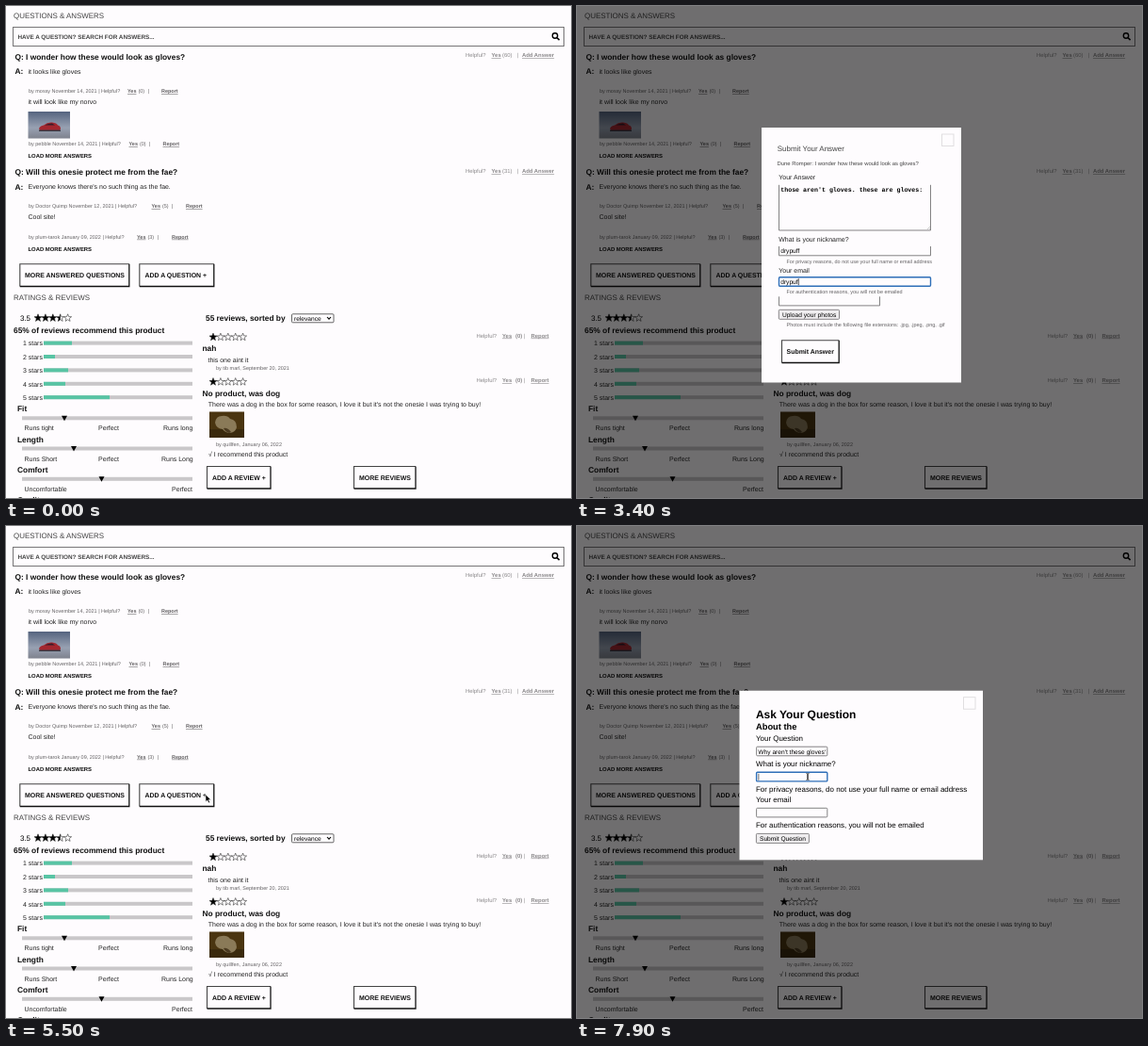
Write an HTML page that moves like this. It is 600 px wide and 522 px high and loops after 8000 ms.

```html
<!DOCTYPE html>
<html lang="en">
<head>
<meta charset="utf-8">
<title>Questions and answers</title>
<style>
  html, body { margin: 0; width: 100%; height: 100%; overflow: hidden; background: #fefcfe; }
  svg { display: block; }
  text { font-family: "Liberation Sans", Arial, sans-serif; white-space: pre; text-rendering: geometricPrecision; }
  .bold { font-weight: bold; }
  .link { font-weight: bold; text-decoration: underline; }
  .mono { font-family: "Liberation Mono", monospace; font-weight: bold; }
</style>
</head>
<body>
<svg id="stage" width="600" height="522" viewBox="0 0 600 522">
  <defs>
    <linearGradient id="sky" x2="0" y2="1">
      <stop offset="0" stop-color="#55647f"/><stop offset=".6" stop-color="#98a1b2"/><stop offset="1" stop-color="#7f838e"/>
    </linearGradient>
  </defs>
  <g id="page"></g>
  <g id="overlay"></g>
</svg>
<script>
const LOOP = 8000, STEP = 100;
const TINY = 5.47, SMALL = 5.9, INPUT = 6.63, BODY = 6.965, BASE = 7.94, HEAD = 8.37, BIG = 11.94;
const WHITE = '#fefcfe', INK = '#222', GREY = '#626062', PALE = '#8c8a8c';

// Drawing helpers, all returning SVG markup
const text = (x, y, size, str, cls = '', fill = INK) =>
  `<text x="${x}" y="${y}" font-size="${size}" class="${cls}" fill="${fill}">${str.replace(/&/g, '&amp;')}</text>`;
const bold = (x, y, size, str, fill = '#111') => text(x, y, size, str, 'bold', fill);
const rect = (x, y, w, h, fill, more = '') =>
  `<rect x="${x}" y="${y}" width="${w}" height="${h}" fill="${fill}" ${more}/>`;
const path = (d, fill, stroke = 'none', width = 1) =>
  `<path d="${d}" fill="${fill}" stroke="${stroke}" stroke-width="${width}"/>`;

const bigButton = (x, y, w, h, label, pad) =>
  path(`M${x} ${y + h}V${y}H${x + w}`, WHITE, '#444', 1.1) +
  path(`M${x} ${y + h}H${x + w}V${y}`, 'none', '#111', 1.3) +
  bold(x + pad, y + h / 2 + 2.5, BODY, label);

const smallButton = (x, y, w, label, pressed) =>
  rect(x, y, w, 10, pressed ? '#d8d6d8' : '#efedef', 'rx="1" stroke="#6b696b" stroke-width=".8"') +
  text(x + 3.6, y + 7.5, INPUT, label, '', '#000');

function starShape(cx, cy, r) {
  const points = Array.from({ length: 10 }, (_, i) => {
    const a = i * Math.PI / 5, d = i % 2 ? r * .42 : r;
    return `${(cx + d * Math.sin(a)).toFixed(2)} ${(cy - d * Math.cos(a)).toFixed(2)}`;
  });
  return `M${points.join('L')}Z`;
}

function stars(x, y, score) {
  let out = '';
  for (let i = 0; i < 5; i++) {
    const cx = x + 4 + i * 7.9, full = Math.min(1, Math.max(0, score - i));
    out += path(starShape(cx, y, 4.2), full === 1 ? '#000' : 'none', '#222', .55);
    if (full === .5) out += path(`M${cx} ${y - 4.2}L${cx - 1} ${y - 1.3}H${cx - 4}L${cx - 1.6} ${y + .6}L${cx - 2.5} ${y + 3.4}L${cx} ${y + 1.8}Z`, '#000');
  }
  return out;
}

const byline = (y, str, yesX, count, reportX) =>
  text(24, y, TINY, `by ${str} | Helpful?`, '', GREY) +
  text(yesX, y, TINY, 'Yes', 'link', GREY) +
  text(yesX + 11.5, y, TINY, `(${count})`, '', GREY) +
  text(yesX + 21.5, y, TINY, '|', '', GREY) +
  text(reportX, y, TINY, 'Report', 'link', GREY);

const helpful = (x, y, count, countX, barX, linkX, link, cls) =>
  text(x, y, SMALL, 'Helpful?', '', PALE) +
  text(x + 27.5, y, SMALL, 'Yes', 'link', PALE) +
  text(x + countX, y, SMALL, `(${count})`, cls, PALE) +
  text(x + barX, y, SMALL, '|', '', PALE) +
  text(x + linkX, y, SMALL, link, 'link', PALE);
const questionHelp = (y, count) => helpful(488, y, count, 39, 55, 60, 'Add Answer', '');
const reviewHelp = y => helpful(499.5, y, 0, 41.5, 50.5, 58, 'Report', 'bold');

const slider = (y, name, mark, labels) =>
  bold(12, y, HEAD, name) + rect(17, y + 5, 181, 4, '#c9c7c9') +
  path(`M${mark - 3} ${y + 4.4}h6l-3 5.6z`, '#000') +
  labels.map(([x, label]) => text(x, y + 20, BODY, label)).join('');

const carPhoto = () =>
  rect(23.5, 112, 44.5, 28.5, 'url(#sky)') +
  path('M35 130q1-3 5-3.500q4-3.500 9-3q5 .5 6 3q3 .5 3 4l-1 1.500h-21z', '#a3272f') +
  path('M41 126.500q4-2 8-2l3 2z', '#3a1c28') + rect(35, 131.5, 23, 1.5, '#3a3a44');

const animalPhoto = () =>
  rect(216, 430.5, 37, 27.5, '#4a3510') + rect(216, 449, 37, 9, '#3a2a0d') +
  path('M222 442q1-7 7-7q6-1 9 3q7 1 7 9q-1 5-7 6q-5 0-8-4q-7-1-8-7z', '#8a7a58') +
  path('M231 448q4-1 8 4l-2 1q-4-1-6-5z', '#4a3a20');

function pageMarkup() {
  const shares = [30, 12, 26, 23, 70];
  return rect(0, 0, 600, 522, WHITE) +
    text(8, 13.2, BASE, 'QUESTIONS & ANSWERS', '', '#444') +
    rect(7.5, 22.5, 585, 20, 'none', 'stroke="#777577"') +
    bold(12.5, 34.8, 6.37, 'HAVE A QUESTION? SEARCH FOR ANSWERS...', '#444') +
    '<circle cx="583" cy="31.500" r="2.700" fill="none" stroke="#000" stroke-width="1.400"/>' +
    path('M585 33.500l2.600 2.600', 'none', '#000', 1.7) +

    bold(9.5, 56.5, HEAD, 'Q: I wonder how these would look as gloves?') + questionHelp(54.2, 60) +
    bold(9.5, 72, HEAD, 'A:') + text(23.5, 71.8, BODY, 'it looks like gloves') +
    byline(92, 'mossy November 14, 2021', 129, 0, 165) +
    text(23.5, 103.6, BODY, 'it will look like my norvo') + carPhoto() +
    byline(148, 'pebble November 14, 2021', 130.5, 0, 166.5) +
    bold(23.5, 161, SMALL, 'LOAD MORE ANSWERS') +

    bold(9.5, 179, HEAD, 'Q: Will this onesie protect me from the fae?') + questionHelp(177, 31) +
    bold(9.5, 194.5, HEAD, 'A:') + text(23.5, 194.3, BODY, "Everyone knows there's no such thing as the fae.") +
    byline(214.3, 'Doctor Quimp November 12, 2021', 154.5, 5, 191) +
    text(23.5, 226.1, BODY, 'Cool site!') +
    byline(246.6, 'plum-tarok January 09, 2022', 139, 3, 176) +
    bold(23.5, 260, SMALL, 'LOAD MORE ANSWERS') +
    bigButton(14.8, 273.8, 116, 23.7, 'MORE ANSWERED QUESTIONS', 5.2) +
    bigButton(141.8, 273.8, 79, 23.7, 'ADD A QUESTION +', 5.6) +

    text(8, 312, BASE, 'RATINGS & REVIEWS', '', '#444') +
    text(15, 334, BASE, '3.5', '', '#000') + stars(30, 331, 3.5) +
    bold(8, 347.3, HEAD, '65% of reviews recommend this product') +
    shares.map((share, i) => {
      const y = 357.6 + i * 14.4;
      return text(18, y + 2.7, BODY, `${i + 1} stars`) +
        rect(40, y - 2, 158, 4, '#c9c7c9') + rect(40, y - 2, share, 4, '#58c4a4');
    }).join('') +
    slider(430.3, 'Fit', 62, [[19.5, 'Runs tight'], [98, 'Perfect'], [167, 'Runs long']]) +
    slider(462.5, 'Length', 72, [[19.5, 'Runs Short'], [98, 'Perfect'], [165, 'Runs Long']]) +
    slider(494.8, 'Comfort', 101.5, [[19.5, 'Uncomfortable'], [176, 'Perfect']]) +
    bold(12, 527, HEAD, 'Quality') +

    bold(212, 334, HEAD, '55 reviews, sorted by') +
    rect(303.5, 326.8, 44.5, 9, WHITE, 'rx="1" stroke="#555" stroke-width=".9"') +
    text(306, 333.7, INPUT, 'relevance', '', '#000') + path('M341 330l2 2.200l2-2.200', 'none', '#000', 1.1) +
    stars(216, 351.3, 1) + reviewHelp(351.5) + bold(208.5, 366.2, HEAD, 'nah') +
    text(214.5, 377.6, BODY, 'this one aint it') +
    text(223, 386.2, TINY, 'by tib marl, September 20, 2021', '', GREY) +
    stars(216, 398.8, 1) + reviewHelp(399) + bold(208.5, 414, HEAD, 'No product, was dog') +
    text(214.8, 425.2, BODY, "There was a dog in the box for some reason, I love it but it's not the onesie I was trying to buy!") +
    animalPhoto() +
    text(223, 467, TINY, 'by quillfen, January 06, 2022', '', GREY) +
    text(215, 477.7, BODY, '√ I recommend this product') +
    bigButton(213.5, 488.5, 67.5, 23.5, 'ADD A REVIEW +', 5.4) +
    bigButton(369.5, 488.5, 65.5, 23.5, 'MORE REVIEWS', 5.5);
}

// Form fields
const pen = document.createElement('canvas').getContext('2d');
function textWidth(str, mono) {
  pen.font = mono ? 'bold 100px "Liberation Mono", monospace' : '100px "Liberation Sans", Arial, sans-serif';
  return pen.measureText(str).width * INPUT / 100;
}

function field(x, y, w, h, str, focused, { mono = false, open = true } = {}) {
  const length = textWidth(str, mono), inner = w - 3.4;
  const start = focused ? Math.min(0, inner - length - .4) : 0;
  const frame = focused
    ? rect(x, y, w, h, WHITE, 'rx="1" stroke="#2f6fb8" stroke-width="1.400"')
    : open ? path(`M${x} ${y}v${h}h${w}v${-h}`, WHITE, '#777577', .9)
           : rect(x, y, w, h, WHITE, 'rx="1" stroke="#777577" stroke-width=".9"');
  const caret = focused ? rect(start + length + .2, mono ? 1.2 : 1.5, .7, 7, '#000') : '';
  return frame + `<svg x="${x + 1.7}" y="${y}" width="${inner}" height="${h}">` +
    text(start, 7.4, INPUT, str, mono ? 'mono' : '', '#000') + caret + '</svg>';
}

const typed = (str, t, from, to) =>
  str.slice(0, Math.floor(str.length * Math.min(1, Math.max(0, (t - from) / (to - from)))));

const panel = (x, y, w, h) =>
  rect(0, 0, 600, 522, '#000', 'opacity=".56"') + rect(x, y, w, h, WHITE) +
  rect(x + w - 20.5, y + 7, 12.5, 12.5, 'none', 'stroke="#dddbdd" stroke-width=".9"');

const PRIVACY = 'For privacy reasons, do not use your full name or email address';
const NO_MAIL = 'For authentication reasons, you will not be emailed';

function answerForm(t) {
  const label = (y, str) => text(214.3, y, BODY, str);
  const note = (y, str) => text(222.5, y, TINY, str, '', GREY);
  const pasted = t >= 4200 ? 'iday_0009_Evolg-Marsh-gloves.jpg' : '';
  const answer = typed("those aren't gloves. these are gloves:", t, 470, 2080);
  return panel(196, 129, 212, 270.5) +
    text(212.8, 154.2, BASE, 'Submit Your Answer', '', '#444') +
    text(212.5, 168.6, SMALL, 'Dune Romper: I wonder how these would look as gloves?', '', '#444') +
    label(184, 'Your Answer') +
    field(214.5, 189.8, 161, 48.2, answer, t >= 400 && t < 2300, { mono: true }) +
    path('M372 237l3-3M374 237l1-1', 'none', '#999', .5) +
    label(249.5, 'What is your nickname?') +
    field(214.5, 255, 161, 9.8, typed('drypuff', t, 2300, 2850), t >= 2300 && t < 3100) +
    note(272.6, PRIVACY) + label(282.6, 'Your email') +
    field(214.5, 287.7, 161, 9.6, typed('drypuff@puff.dry', t, 3100, 3850), t >= 3100 && t < 4100) +
    note(305, NO_MAIL) + field(214.5, 308.3, 107, 9.6, pasted, t >= 4100) +
    smallButton(214.3, 322.3, 64.2, 'Upload your photos', t >= 4400 && t < 4600) +
    note(339.8, 'Photos must include the following file extensions: .jpg, .jpeg, .png, .gif') +
    bigButton(217.5, 354.8, 60.7, 23.7, 'Submit Answer', 5);
}

const successBox = () => panel(223, 227, 158, 74.5) +
  bold(240, 256, BIG, 'Submission Success!', '#000') +
  text(240, 268, BASE, 'Thank you for your input.', '', '#000') +
  smallButton(240.8, 274, 17, 'OK', true);

function askForm(t) {
  const line = (y, str) => text(190, y, BASE, str, '', '#000');
  const box = (y, str, focused) => field(190.6, y, 75.2, 9.6, str, focused, { open: false });
  const question = typed("Why aren't ", t, 5950, 6850) + typed('these glove', t, 6850, 7100) + typed('s?', t, 7200, 7400);
  return panel(172.5, 174.7, 258.5, 179.6) +
    bold(190, 203.5, BIG, 'Ask Your Question', '#000') + bold(190, 216.4, 9.31, 'About the', '#000') +
    line(228, 'Your Question') + box(234.2, question, t >= 5900 && t < 7700) +
    line(255, 'What is your nickname?') + box(261.3, '', t >= 7700) +
    line(282.2, PRIVACY) + line(293, 'Your email') + box(299.3, '', false) +
    line(320.3, NO_MAIL) + smallButton(190.4, 326.4, 56, 'Submit Question');
}

// Pointer: time, x, y, shape held until the next key
const POINTER = [
  [0, 480, 110, ''], [100, 480, 110, 'arrow'], [400, 290, 212, 'beam'], [600, 290, 212, ''],
  [2100, 290, 212, 'beam'], [2300, 321, 260, 'beam'], [2400, 321, 260, ''],
  [2900, 321, 260, 'beam'], [3100, 318, 292, 'beam'], [3200, 318, 292, ''],
  [3900, 318, 292, 'beam'], [4100, 300, 312, 'beam'], [4200, 300, 312, 'arrow'],
  [4400, 263, 329, 'arrow'], [4600, 263, 329, 'arrow'], [5000, 249, 368, 'arrow'], [5100, 249, 368, 'arrow'],
  [5300, 252, 280, 'arrow'], [5400, 252, 280, 'arrow'], [5500, 212, 285, 'arrow'], [5600, 212, 285, 'arrow'],
  [5700, 255, 254, 'beam'], [5900, 240, 239, 'beam'], [6000, 240, 239, ''],
  [7500, 240, 239, 'beam'], [7700, 245, 266, 'beam'], [LOOP, 245, 266, '']
];
const SHAPES = {
  '': '',
  arrow: path('M0 0v7.500l1.800-1.500l1.300 2.800l1.400-.6l-1.300-2.800h2.400z', '#000', '#fff', .5),
  beam: path('M-1.500-3.500q1.500 0 1.500 1v5q0 1-1.500 1M1.500-3.500q-1.500 0-1.500 1v5q0 1 1.500 1', 'none', '#111', .8)
};

function pointer(t) {
  const next = POINTER.findIndex(key => key[0] > t);
  const [t0, x0, y0, shape] = POINTER[next - 1], [t1, x1, y1] = POINTER[next];
  const p = (t - t0) / (t1 - t0), k = p * p * (3 - 2 * p);
  return `<g transform="translate(${x0 + (x1 - x0) * k} ${y0 + (y1 - y0) * k})">${SHAPES[shape]}</g>`;
}

function dialog(t) {
  if (t < 100) return '';
  if (t < 5100) return answerForm(t);
  if (t < 5500) return successBox();
  return t < 5600 ? '' : askForm(t);
}

document.getElementById('page').innerHTML = pageMarkup();
const overlay = document.getElementById('overlay');
const started = performance.now();
let shown = -1;

function draw() {
  const t = Math.floor((performance.now() - started) % LOOP / STEP) * STEP;
  if (t !== shown) overlay.innerHTML = dialog(t) + pointer(t);
  shown = t;
  requestAnimationFrame(draw);
}
draw();
</script>
</body>
</html>
```
